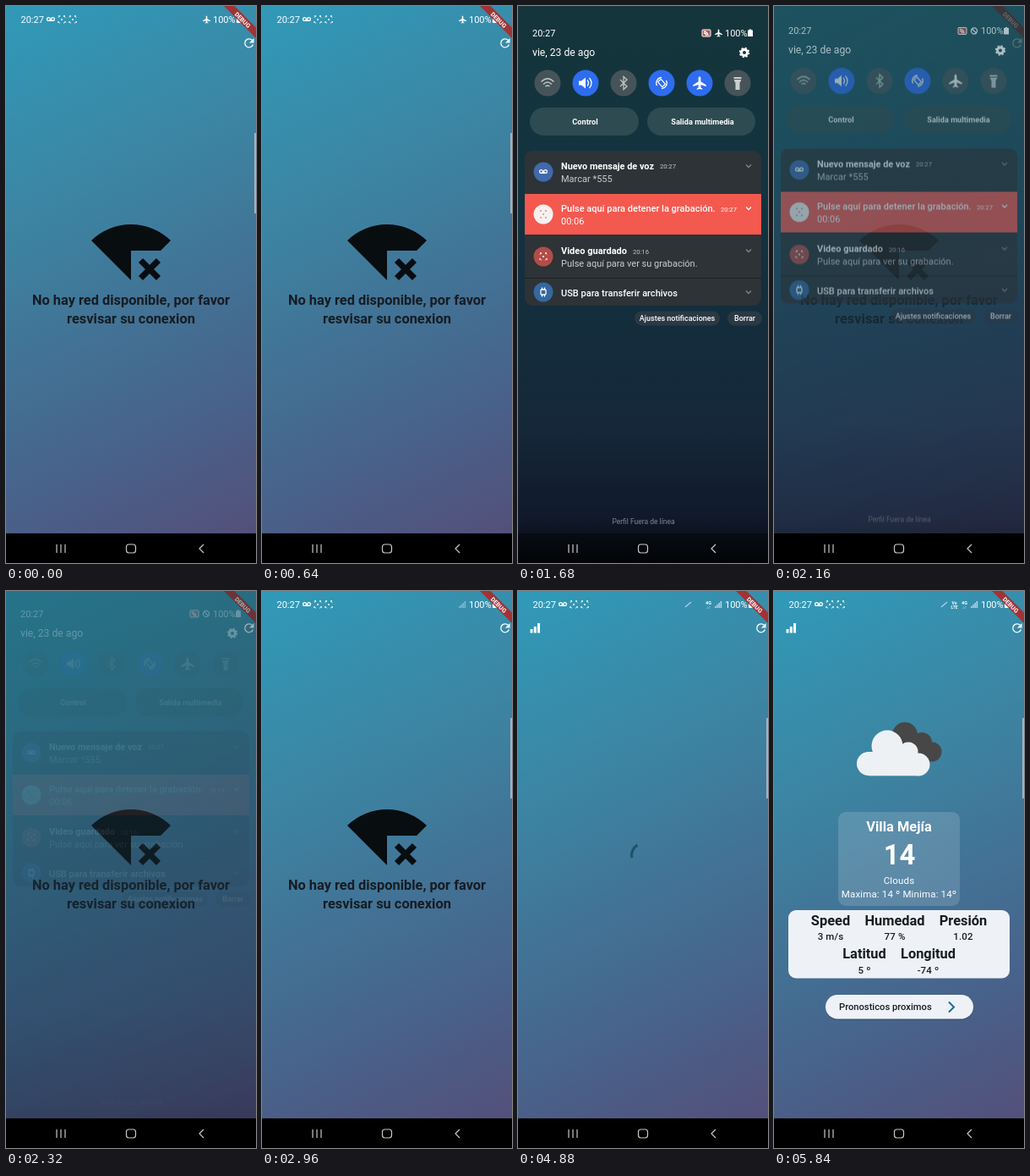
Recreate the animation shown at these times as an HTML page. Size 296x658 px, loop 5.92 s.

```html
<!DOCTYPE html>
<html lang="es">
<head>
<meta charset="utf-8">
<title>Clima sin conexión</title>
<style>
  html, body { margin: 0; width: 100%; height: 100%; overflow: hidden; background: #000; }
  svg { display: block; width: 296px; height: 658px; font: 11px Roboto, sans-serif; fill: #fff; }
  .mid { text-anchor: middle; }
  .bold { font-weight: 700; }
  .med { font-weight: 500; }
  .big { font-size: 16.4px; font-weight: 700; }
  .small { font-size: 11.5px; letter-spacing: .15px; }
  .tiny { font-size: 7.6px; fill: #c3c9cc; }
  .line { fill: none; stroke: #fff; stroke-width: 1.3; }
  .grey { fill: #c9ced1; }
  .dark { fill: #171c21; }
</style>
</head>
<body>
<svg viewBox="0 0 296 658">
  <defs>
    <linearGradient id="sky" gradientUnits="userSpaceOnUse" x1="0" y1="0" x2="296" y2="622">
      <stop offset="0" stop-color="#309ab8"/>
      <stop offset=".35" stop-color="#3c84a2"/>
      <stop offset=".75" stop-color="#47648c"/>
      <stop offset="1" stop-color="#53507a"/>
    </linearGradient>
    <linearGradient id="night" x2="0" y2="1">
      <stop offset="0" stop-color="#15353b"/>
      <stop offset=".35" stop-color="#123340"/>
      <stop offset=".75" stop-color="#15283a"/>
      <stop offset=".92" stop-color="#10192a"/>
      <stop offset="1" stop-color="#05070b"/>
    </linearGradient>
    <path id="plane" d="M0-5.5C.8-5.5 1-4.5 1-3.5V-1.3L5.5 1.6V2.8L1 1.5V3.7L2.4 4.8V5.6L0 5L-2.4 5.6V4.8L-1 3.7V1.5L-5.5 2.8V1.6L-1-1.3V-3.5C-1-4.5-.8-5.5 0-5.5Z"/>
    <path id="corners" class="line" stroke-dasharray="2 1.4" d="M-2-4H-4V-2M2-4H4V-2M-4 2V4H-2M4 2V4H2M-1 0H1"/>
    <path id="chevron" class="line" d="M-3-1.5L0 1.5L3-1.5"/>
    <g id="voicemail" class="line"><circle cx="-2.5" r="1.9"/><circle cx="2.5" r="1.9"/><path d="M-2.5 1.9H2.5"/></g>
    <g id="banned" class="line"><circle r="3.5"/><path d="M-2.5-2.5L2.5 2.5"/></g>
    <path id="battery" d="M-3-3.5H-1.3V-4.5H1.3V-3.5H3V4H-3Z"/>
  </defs>

  <rect width="296" height="623" fill="url(#sky)"/>

  <g id="offline">
    <path fill="#080d10" d="M101 277A67.6 67.6 0 0 1 195 277L183 289H148V324Z"/>
    <path d="M159.5 300.5L180.5 321.5M180.5 300.5L159.5 321.5" stroke="#080d10" stroke-width="7.2"/>
    <g class="big mid dark">
      <text x="148" y="353">No hay red disponible, por favor</text>
      <text x="148" y="375">resvisar su conexion</text>
    </g>
  </g>

  <path id="spinner" fill="none" stroke="#1c5468" stroke-width="3.2"/>
  <path id="bars" d="M14.5 45h3v4.500h-3zM18.800 42h3v7.500h-3zM23 38h3v11.500h-3z"/>

  <g id="weather">
    <g fill="#474747">
      <circle cx="155" cy="170" r="15"/><circle cx="175" cy="179" r="12"/><circle cx="187" cy="190" r="11.500"/>
      <rect x="150" y="180" width="38" height="21"/>
    </g>
    <g fill="#edf1f4">
      <circle cx="134" cy="183" r="18.500"/><circle cx="159" cy="190" r="11.500"/><circle cx="171" cy="205" r="13.500"/>
      <circle cx="112" cy="204" r="14"/><rect x="112" y="190" width="58" height="28.300"/>
    </g>
    <rect x="76" y="261" width="144" height="111" rx="9" fill-opacity=".15"/>
    <g class="mid">
      <text class="big" x="148" y="284">Villa Mejía</text>
      <text class="bold" x="148.500" y="323" font-size="32.9">14</text>
      <text class="small" x="148" y="346">Clouds</text>
      <text class="small" x="148" y="362">Maxima: 14 º Minima: 14º</text>
    </g>
    <rect x="17" y="377" width="262" height="80.500" rx="9" fill="#eef2f6"/>
    <g class="big mid dark">
      <text x="67" y="395">Speed</text><text x="143" y="395">Humedad</text><text x="224" y="395">Presión</text>
      <text x="107" y="434">Latitud</text><text x="182.500" y="434">Longitud</text>
    </g>
    <g class="small med mid dark">
      <text x="67" y="412">3 m/s</text><text x="143" y="412">77 %</text><text x="224" y="412">1.02</text>
      <text x="107" y="452">5 º</text><text x="182.500" y="452">-74 º</text>
    </g>
    <rect x="61" y="478.500" width="175" height="28.500" rx="14.200" fill="#1c3048" fill-opacity=".3"/>
    <rect x="61" y="477" width="175" height="28.500" rx="14.200" fill="#eef2f6"/>
    <text class="med dark" x="77" y="495" font-size="11.2">Pronosticos proximos</text>
    <path d="M207 485.500L213 491.500L207 497.500" fill="none" stroke="#1c6a96" stroke-width="2"/>
  </g>

  <path class="line" stroke-width="1.6" d="M291.500 40.500A5 5 0 1 0 292.500 45.500"/>
  <path d="M293.500 38V43.500H288Z"/>

  <g id="status">
    <text x="17.500" y="20">20:27</text>
    <use href="#voicemail" x="53" y="15.500"/>
    <use href="#corners" x="66" y="16"/>
    <use href="#corners" x="79" y="16"/>
    <use href="#plane" id="planeSmall" transform="translate(237.500 16) scale(.8)"/>
    <use href="#banned" id="bannedSmall" x="237" y="16"/>
    <path id="signal" d="M233 18h1.500v2h-1.500zM235.200 16h1.500v4h-1.500zM237.400 14h1.500v6h-1.500zM239.600 12h1.500v8h-1.500z"/>
    <g id="data" class="mid bold" font-size="5.5">
      <path class="line" opacity=".6" d="M198 19L205 13"/>
      <text x="225.500" y="15.500">4G</text><text x="225.500" y="20.500">↓↑</text>
    </g>
    <g id="volte" class="mid bold" font-size="5">
      <text x="213.500" y="15.500">Vo</text><text x="213.500" y="20.500">LTE</text>
    </g>
    <text x="245" y="20">100%</text>
    <use href="#battery" x="276" y="16"/>
    <rect x="294" y="150" width="2" height="95" fill="#b9c4cc" fill-opacity=".8"/>
  </g>

  <path fill="#a03335" d="M258 0H270.500L296 25.500V38Z"/>
  <text class="mid bold" font-size="7.2" transform="translate(278.300 18.300) rotate(45)">DEBUG</text>

  <rect id="shade" width="296" height="658" fill="url(#night)"/>
  <g id="panel">
    <g id="header">
      <text x="17" y="36">20:27</text>
      <text x="17" y="59" font-size="12.2">vie, 23 de ago</text>
      <rect x="218" y="28" width="10" height="8" rx="1" fill="#b5544f" stroke="#fff"/>
      <path class="line" d="M220 32A3 3 0 0 1 223 35M220 30A5 5 0 0 1 225 35"/>
      <use href="#plane" id="planePanel" transform="translate(237.500 32) scale(.8)"/>
      <use href="#banned" id="bannedPanel" x="237" y="32"/>
      <text x="245" y="36">100%</text>
      <use href="#battery" x="275" y="32"/>
      <circle cx="268" cy="55" r="3.500" fill="none" stroke="#fff" stroke-width="3"/>
      <circle cx="268" cy="55" r="5.300" fill="none" stroke="#fff" stroke-width="1.800" stroke-dasharray="2.200 1.963"/>
    </g>
    <g id="content">
      <g id="toggles"></g>
      <g class="line" stroke="#fff" stroke-width="1.6">
        <g opacity=".65">
          <path d="M27.500 89.500Q35 82 42.500 89.500M30 92.500Q35 87.500 40 92.500M32.500 95Q35 93 37.500 95"/>
          <path d="M121 87L129 95L125 98.500V83.500L129 87L121 95"/>
        </g>
        <path d="M82 87.500Q85 91 82 94.500M84.500 85Q89.500 91 84.500 97"/>
        <path d="M164.500 94A6.500 6.500 0 0 1 170 84.500M175.500 88A6.500 6.500 0 0 1 170 97.500"/>
        <rect x="167.500" y="87" width="5" height="8" rx="1" transform="rotate(-40 170 91)"/>
      </g>
      <path d="M72 88.500H75L80 84.500V97.500L75 93.500H72Z"/>
      <use href="#plane" id="planeToggle"/>
      <path class="grey" d="M255.500 84H264.500V86H255.500ZM255.500 87H264.500L262.500 91V99H257.500V91Z"/>

      <g fill="#2e4b52"><rect x="14" y="120" width="129" height="33" rx="16.500"/><rect x="153" y="120" width="128" height="33" rx="16.500"/></g>
      <g class="mid bold" font-size="9.2">
        <text x="79.500" y="140">Control</text><text x="218.500" y="140">Salida multimedia</text>
      </g>

      <rect x="8" y="171" width="280" height="183" rx="9" fill="#2d3336"/>
      <path fill="#f4594f" d="M8 222H288V270H8Z"/>
      <path d="M8 321.500H288" stroke="#1c2124"/>
      <circle cx="30" cy="196" r="11.500" fill="#4169ab"/><use href="#voicemail" x="30" y="195.500"/>
      <circle cx="30" cy="246" r="11.500" fill="#f6f1f0"/>
      <path d="M26 242h2M32 242h2M26 250h2M32 250h2M29 246h2" stroke="#d98b85" stroke-width="1.300"/>
      <circle cx="30" cy="296" r="11.500" fill="#b34c49"/><use href="#corners" x="30" y="296"/>
      <circle cx="30" cy="338" r="11.500" fill="#3568a0"/>
      <rect class="line" x="27" y="335" width="6" height="6" rx="1"/>
      <path class="line" d="M28.500 332.500v2.500M31.500 332.500v2.500M28.500 341v2.500M31.500 341v2.500"/>
      <g class="bold">
        <text x="51" y="192.500" font-size="10.9">Nuevo mensaje de voz</text>
        <text x="51" y="293">Video guardado</text>
      </g>
      <g class="med">
        <text x="51" y="243">Pulse aquí para detener la grabación.</text>
        <text x="51" y="342.500">USB para transferir archivos</text>
      </g>
      <text class="grey" x="51" y="208">Marcar *555</text>
      <text id="timer" x="51" y="258"></text>
      <text class="grey" x="51" y="308">Pulse aquí para ver su grabación.</text>
      <g class="tiny">
        <text x="168" y="192">20:27</text><text x="240" y="242.500" fill="#fff">20:27</text><text x="136" y="292.500">20:16</text>
      </g>
      <use href="#chevron" x="273" y="239"/>
      <g opacity=".4"><use href="#chevron" x="273" y="189"/><use href="#chevron" x="273" y="289"/><use href="#chevron" x="273" y="338"/></g>

      <g id="footer">
        <g fill="#2b3945"><rect x="138" y="360.500" width="101" height="17" rx="8.500"/><rect x="248" y="360.500" width="41" height="17" rx="8.500"/></g>
        <g class="mid med" font-size="9"><text x="188.500" y="372">Ajustes notificaciones</text><text x="268.500" y="372">Borrar</text></g>
        <text class="mid" x="148.500" y="612" font-size="8.500" fill="#7f8890">Perfil Fuera de línea</text>
      </g>
    </g>
  </g>

  <rect id="navBack" y="623" width="296" height="35" fill="#000"/>
  <g class="line" style="stroke:#c8c8c8;stroke-width:1.200">
    <path d="M60 636V646M65 636V646M70 636V646M234 636L229 641L234 646"/>
    <rect x="142.500" y="636" width="11" height="10" rx="3"/>
  </g>
</svg>
<script>
const LOOP = 5920, STEP = 80;
const TOGGLE_OFF = 1840, SIGNAL_ON = 2720, CONNECTED = 3440, LOADED = 5600;
const $ = id => document.getElementById(id);
const clamp = v => Math.max(0, Math.min(1, v));
const ramp = (t, from, to) => clamp((t - from) / (to - from));
const fade = (id, opacity) => $(id).setAttribute('opacity', opacity);
const move = (id, x, y) => $(id).setAttribute('transform', `translate(${x} ${y})`);

$('toggles').innerHTML = [0, 1, 0, 1, 1, 0].map((on, i) =>
  `<circle cx="${35 + 45 * i}" cy="91" r="15.500" fill="${on ? '#2e6cf0' : '#465459'}"/>`).join('');
const planeButton = $('toggles').children[4];

// cubic-bezier(.4, 0, .2, 1), solved by bisection
function ease(x) {
  let lo = 0, hi = 1;
  for (let i = 0; i < 20; i++) {
    const s = (lo + hi) / 2, r = 1 - s;
    if (1.2 * r * r * s + .6 * r * s * s + s ** 3 < x) lo = s; else hi = s;
  }
  return 3 * (1 - lo) * lo * lo + lo ** 3;
}

// Material indeterminate progress: head runs ahead, tail catches up, all rotating
function spinnerPath(elapsed) {
  const phase = elapsed / 1333 % 1;
  const head = ease(ramp(phase, 0, .5)), tail = ease(ramp(phase, .5, 1));
  const start = Math.PI * (-.5 + 1.5 * tail + 2 * elapsed / 2222 + .5 * phase);
  const sweep = Math.max(.01, 1.5 * Math.PI * (head - tail));
  const point = a => `${148 + 13.5 * Math.cos(a)} ${312 + 13.5 * Math.sin(a)}`;
  return `M${point(start)}A13.5 13.5 0 ${+(sweep > Math.PI)} 1 ${point(start + sweep)}`;
}

function draw(t) {
  const airplane = t < TOGGLE_OFF, connected = t >= CONNECTED, loaded = t >= LOADED;
  const open = t < 1600 ? 1 - (1 - ramp(t, 760, 960)) ** 2 : 1 - ramp(t, 2000, 2440);

  fade('offline', +!connected);
  fade('bars', +connected);
  fade('spinner', +(connected && !loaded));
  fade('weather', +loaded);
  $('spinner').setAttribute('d', spinnerPath(Math.max(0, t - 3370)));

  fade('status', +(open === 0));
  fade('planeSmall', +airplane);
  fade('bannedSmall', +(!airplane && t < SIGNAL_ON));
  fade('signal', t < SIGNAL_ON ? 0 : connected ? .65 : .4);
  fade('data', +connected);
  fade('volte', +(t >= 5360));

  fade('shade', open ** .75);
  fade('header', open);
  fade('content', ramp(open, .2, 1));
  fade('footer', ramp(t, 1000, 1240));
  move('panel', 0, -7 * (1 - open));
  fade('planePanel', +airplane);
  fade('bannedPanel', +!airplane);
  planeButton.setAttribute('fill', airplane ? '#2e6cf0' : '#465459');
  $('planeToggle').setAttribute('transform',
    `translate(215 ${91 + 7 * (1 - ramp(t, 960, 1200))}) scale(1.4)`);
  $('timer').textContent = t < 1440 ? '00:05' : '00:06';
  fade('navBack', 1 - .6 * ramp(open, .8, 1));
}

function tick() {
  const t = performance.now() % LOOP;
  draw(Math.floor(t / STEP) * STEP);
  requestAnimationFrame(tick);
}
tick();
</script>
</body>
</html>
```
